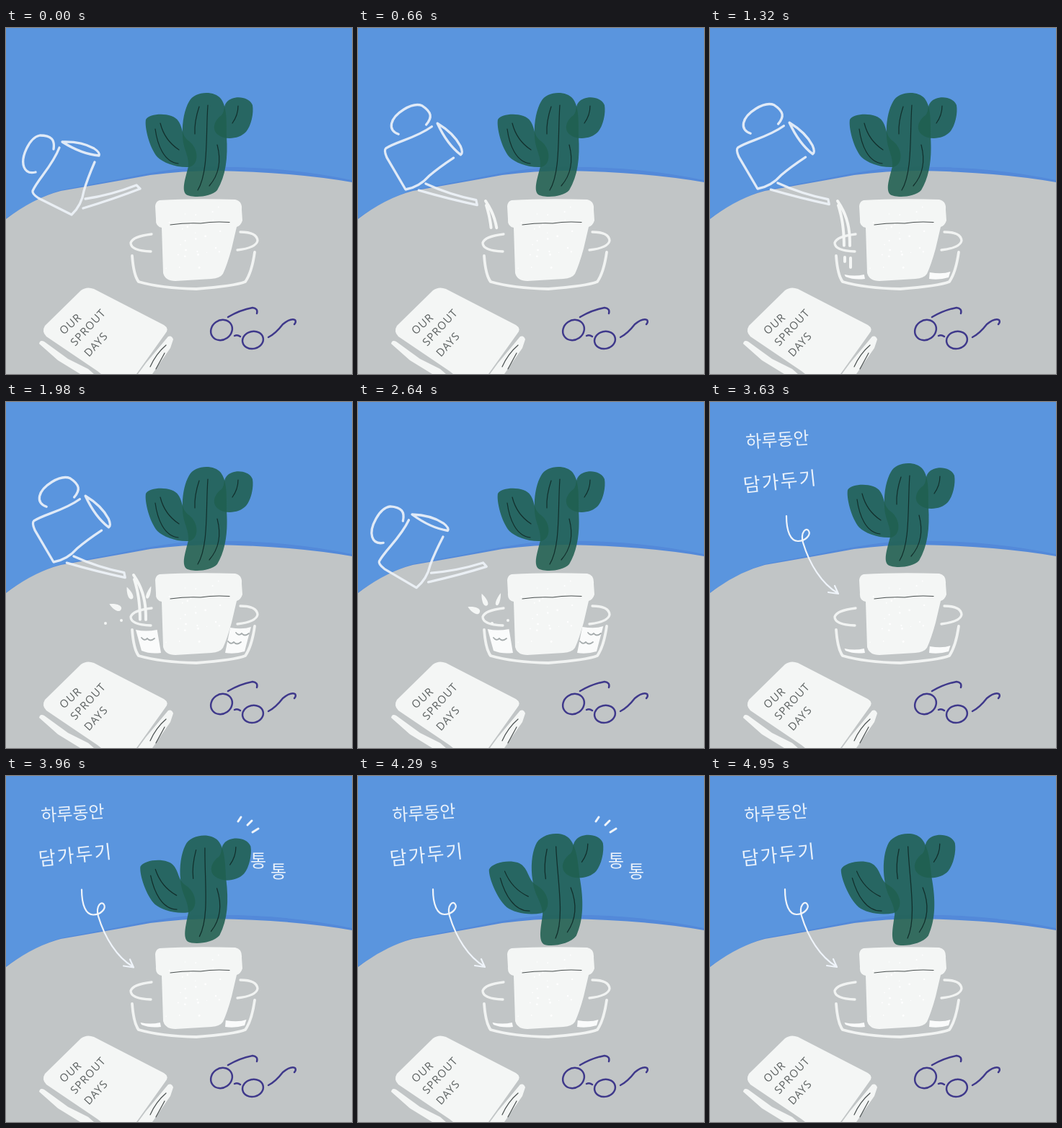
Write an HTML page that moves like this. It is 480 by 480 pixels and loops after 5.28 s.

```html
<!DOCTYPE html>
<html lang="ko">
<head>
<meta charset="utf-8">
<title>Watering a cactus</title>
<style>
  html, body { margin: 0; width: 100%; height: 100%; overflow: hidden; background: #5a95de; }
  svg { display: block; width: 100vw; height: 100vh; }
  .line { fill: none; stroke-linecap: round; stroke-linejoin: round; }
  .white { stroke: #f4f6f5; }
  .ink { stroke: #4a5050; stroke-width: 1.2; }
  .paper { fill: #f4f6f5; }
  .flesh { fill: #1f6050; fill-opacity: .87; }
  .rib { stroke: #122f2c; stroke-width: 1.2; }
  .title { font: 400 15px "Open Sans", "Noto Sans", sans-serif; fill: #5c6161; letter-spacing: 1px; }
  .note { font: 300 24px "Noto Sans CJK KR", "Noto Sans CJK", "Noto Sans CJK JP", sans-serif; fill: #eaf2fb; }
  .wide { font-size: 26px; letter-spacing: 2px; }
</style>
</head>
<body>
<svg viewBox="0 0 480 480">
  <rect width="480" height="480" fill="#5a95de"/>
  <path fill="#5389d9" d="M0 264Q40 236 76 225L150 211Q230 194 270 193Q380 190 480 211V480H0Z"/>
  <path fill="#c1c5c6" d="M0 265Q38 236 76 226Q140 215 200 204Q245 198 290 198Q400 200 480 214V480H0Z"/>

  <g id="cactus">
    <g id="leftArm">
      <path class="flesh" d="M194 127C200 117 232 117 239 129C246 139 243 149 254 157C268 168 268 190 254 193C236 194 218 187 210 179C199 166 192 138 194 127Z"/>
      <path class="line rib" d="M207 140C210 162 219 186 239 188M214 132Q220 156 240 169"/>
    </g>
    <g id="stem">
      <path class="flesh" d="M254 102C261 88 288 86 298 98C307 110 306 130 306 150C308 180 305 205 293 225C284 235 258 236 250 231C243 225 249 208 253 192C254 175 245 168 245 148C244 130 248 112 254 102Z"/>
      <path class="line rib" d="M268 109Q261 130 262 147M280 107C277 150 281 200 266 225M293 162Q302 196 282 219"/>
    </g>
    <g id="rightArm">
      <path class="flesh" d="M306 103C314 93 337 94 342 107C344 118 340 136 333 144C324 154 304 156 294 148C284 140 290 127 299 121C304 115 301 109 306 103Z"/>
      <path class="line rib" d="M322 108Q322 121 314 132"/>
    </g>
  </g>

  <g class="line white" stroke-width="3.3" opacity=".94">
    <path d="M202 286Q176 289 173 298Q173 309 201 310M325 283Q348 283 349 295Q347 305 321 308"/>
    <path stroke-width="3.8" d="M175 316Q177 343 184 352Q215 361 264 362Q317 358 332 352Q341 339 345 311"/>
  </g>
  <path id="water" fill="#fafbfb"/>
  <path id="ripples" class="line" stroke="#a5abac" stroke-width="1.8"/>

  <path class="paper" d="M213 239Q260 236 318 238Q328 240 327 252L328 267Q326 274 320 276L313 306Q307 328 301 341Q297 347 285 348L235 351Q221 351 218 340L216 277Q207 275 208 265L207 247Q208 240 213 239Z"/>
  <g id="specks" fill="#fff"></g>
  <path class="line ink" d="M228 273Q250 270 270 271Q288 268 310 269.500"/>

  <g class="paper">
    <path d="M104 364Q112 358 122 362L219 412Q227 417 221 424L181 480H132L127 476Q90 451 56 428Q49 421 54 413Z"/>
    <path d="M46 438Q47 432 53 435L86 459L114 473L122 480H103L72 461Z"/>
    <path d="M225 428Q230 426 232 432L228 444L203 480H183L194 465Z"/>
  </g>
  <path class="line ink" d="M222 440Q208 452 200 470M220 451L208 473"/>
  <g class="title">
    <text transform="translate(80 426) rotate(-42)">OUR</text>
    <text transform="translate(96 442) rotate(-47)">SPROUT</text>
    <text transform="translate(115 457) rotate(-47)">DAYS</text>
  </g>

  <g class="line" stroke="#3f398b" stroke-width="2.500">
    <ellipse cx="299" cy="419" rx="15.500" ry="13.500" transform="rotate(-35 299 419)"/>
    <ellipse cx="342.500" cy="433" rx="14.500" ry="12" transform="rotate(-12 342 433)"/>
    <path d="M317 427Q321 425 325 428M308 401Q325 391 342 388Q350 389 348 396M364 429Q374 424 384 411Q395 402 401 405Q403 408 400 411"/>
  </g>

  <g id="can" class="line" stroke="#eff4fa" stroke-width="3.3" opacity=".9">
    <path d="M66 168C68 155 63 149 47 149C32 152 20 180 25 193Q29 203 41 200"/>
    <path d="M74 166C64 192 44 210 37 226Q36 230 45 236L91 259Q105 246 108 226Q113 209 123 186"/>
    <path d="M78 158Q104 157 122 167Q131 173 129 177Q105 175 78 158Z"/>
    <path d="M110 237Q145 232 181 218L186 223Q150 237 107 250"/>
  </g>
  <path id="stream" class="line white" stroke-width="4"/>
  <path id="drips" class="line white" stroke-width="4" d="M187 318v6M195 319v13"/>
  <g id="splash" class="paper"></g>

  <g id="note">
    <text class="note" transform="translate(50 64) rotate(-4)">하루동안</text>
    <text class="note wide" transform="translate(47 125) rotate(-6)">담가두기</text>
    <path class="line" stroke="#eff4fa" stroke-width="2.200" d="M106 158C106 180 112 193 122 193C133 193 140 184 137 179C134 173 125 180 129 195C138 225 155 252 177 265M164 264L178 266L173 255"/>
  </g>
  <g id="bounce">
    <text class="note" x="347" y="126">통</text>
    <text class="note" x="375" y="141">통</text>
    <path class="line" stroke="#eff4fa" stroke-width="3" d="M330 63L334 57M343 68L349 62M350 78L358 73"/>
  </g>
</svg>
<script>
const STEP = 330, STEPS = 16;
const $ = id => document.getElementById(id);
const between = (n, a, b) => n >= a && n <= b;
const visible = (id, on) => { $(id).style.display = on ? '' : 'none'; };
const move = (id, ...transform) => $(id).setAttribute('transform', transform.join(' '));
const draw = (id, d) => $(id).setAttribute('d', d);

function add(parent, name, attrs) {
  const el = document.createElementNS('http://www.w3.org/2000/svg', name);
  for (const key in attrs) el.setAttribute(key, attrs[key]);
  parent.appendChild(el);
}

// Turns, grows and shifts a cactus part around its centre.
function swell(id, k, [x, y], [dx, dy], turn, grow) {
  move(id, `translate(${x + dx * k} ${y + dy * k})`, `rotate(${turn * k})`,
    `scale(${1 + grow * k})`, `translate(${-x} ${-y})`);
}

function drawCactus(n) {
  const plump = n < 12 ? 0 : n % 2 ? 1 : .5;
  const hop = n > 10 ? 1 - plump : 0;
  move('cactus', `translate(${-3 * hop} ${-5 * hop})`);
  swell('leftArm', plump, [230, 157], [-6, -1], -8, .06);
  swell('stem', plump, [275, 162], [1, -5], -6.5, .07);
  swell('rightArm', plump, [316, 125], [-3.5, -13], 0, .05);

  visible('note', n > 9);
  move('note', `translate(${-2 * plump} ${-plump})`);
  visible('bounce', between(n, 12, 13));
  move('bounce', `translate(${16 * (plump - 1)} 0)`);
}

function drawCan(n) {
  const back = n > 7;
  const tilt = back ? .12 : Math.min(1, n / 2);
  const wobble = n && n % 3 - 1;
  visible('can', n < 10);
  move('can', `translate(${-25 * tilt - 7 * back} ${-36 * tilt + 2 * back + wobble})`,
    `rotate(${33 * tilt} 91 259)`);
}

// One strand of falling water, curving over from its start.
function strand(x, y, reach, from, to) {
  let d = '';
  for (let t = from; t <= to + .01; t += .1) {
    d += `${d ? 'L' : 'M'}${x + reach * (1 - (1 - t) ** 2.5)} ${y + 62 * t}`;
  }
  return d;
}

function drawStream(n) {
  const from = n === 7 ? .4 : 0, to = n === 2 ? .6 : 1;
  visible('stream', between(n, 2, 7));
  draw('stream', strand(177, 240, 17, from, to) + strand(178, 246, 8, from, to - .1));
  visible('drips', between(n, 3, 4));
}

// Water on both sides of the pot, following its walls and the dish.
function drawWater(n) {
  const level = n < 10 ? Math.max(315, 342 - 13 * (n - 4)) : n === 10 ? 321 : 342;
  const depth = level - 312, y = level - 3;
  const [a, b] = [179 + depth * .25, 209 + depth * .16];
  const [c, d] = [312 - depth * .24, 341 - depth * .25];
  visible('water', n > 3);
  draw('water', `M${a} ${level}Q${a + 14} ${level + 3} ${b} ${level}L215 348Q200 350 188 345Z` +
    `M${c} ${y}Q${c + 18} ${y + 3} ${d} ${y - 1}L331 346Q318 350 304 348Z`);

  const wave = (x, y) => `M${x} ${y}q4 5 8 1q4 5 10 0`;
  const drift = n % 2;
  visible('ripples', between(n, 6, 10));
  draw('ripples', wave(188, 327) + wave(319 - drift * 4, 320) + wave(308 + drift * 3, 332 + drift * 8));
}

function drawSplash(n) {
  const splash = $('splash');
  splash.replaceChildren();
  if (!between(n, 6, 8)) return;
  const reach = 38 - 5 * (n - 6);
  for (let i = 0; i < 3; i++) {
    const angle = 42 * i - 65;
    add(splash, 'path', {
      d: 'M0 -9C4 -3 7 9 0 9C-7 9 -4 -3 0 -9Z',
      transform: `translate(186 300) rotate(${angle}) translate(0 ${-reach}) scale(${1 - i * .2} 1)`
    });
  }
  for (let i = 0; i < 2; i++) {
    add(splash, 'circle', { cx: 138 + 22 * i + 24 * (n - 6), cy: 307 - 4 * i, r: 2 });
  }
}

let seed = 7;
const random = () => (seed = seed * 16807 % 2147483647) / 2147483647;
for (let i = 0; i < 26; i++) {
  add($('specks'), 'circle', { cx: 222 + random() * 80, cy: 243 + random() * 98, r: .5 + random() });
}

let current = -1;
function frame() {
  const n = Math.floor(performance.now() / STEP) % STEPS;
  if (n !== current) {
    current = n;
    for (const part of [drawCactus, drawCan, drawStream, drawWater, drawSplash]) part(n);
  }
  requestAnimationFrame(frame);
}
frame();
</script>
</body>
</html>
```
